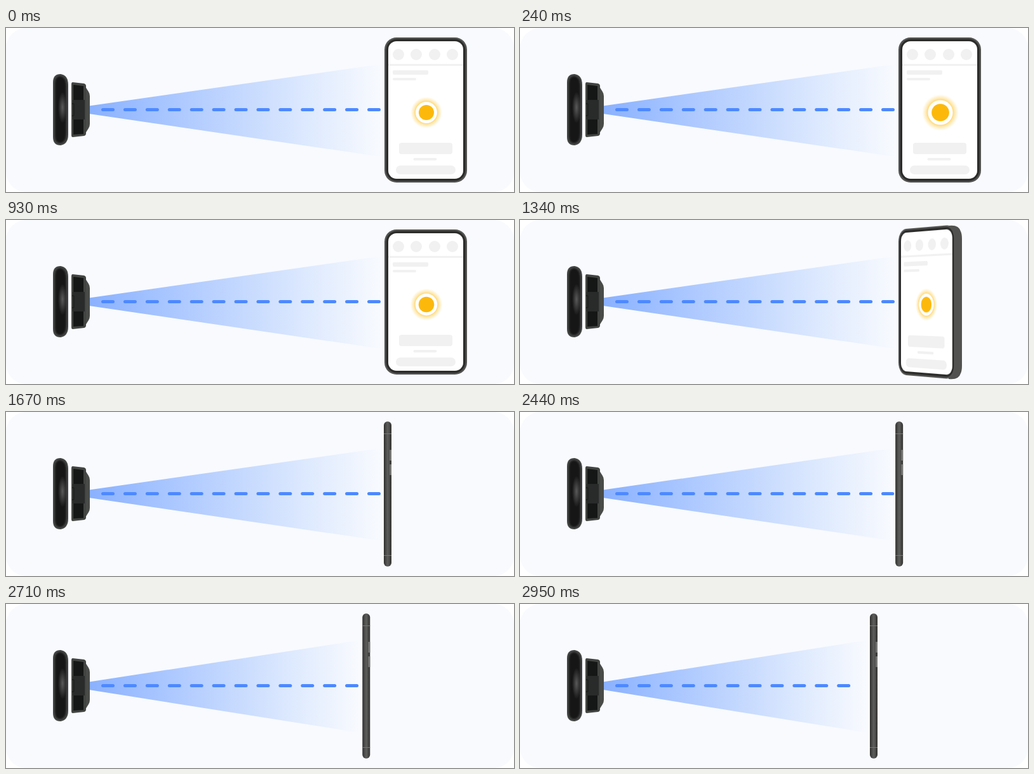
Recreate the animation shown at these times as an HTML page. Size 800x260 px, loop 4.48 s.

```html
<!DOCTYPE html>
<html lang="en">
<head>
<meta charset="utf-8">
<title>Scan distance</title>
<style>
  html, body { margin: 0; width: 100%; height: 100%; overflow: hidden; background: #fff; }
  #stage { position: relative; width: 800px; height: 260px; overflow: hidden; }
  svg { position: absolute; left: 0; top: 0; display: block; }
  #front { transform-origin: 596px 130px; }
</style>
</head>
<body>
<div id="stage">
  <svg width="800" height="260" viewBox="0 0 800 260">
    <defs>
      <linearGradient id="beamFill">
        <stop offset="0" stop-color="#8ab1ff"/>
        <stop offset=".27" stop-color="#a9c6ff"/>
        <stop offset=".58" stop-color="#cbddfe"/>
        <stop offset=".8" stop-color="#e3edfe"/>
        <stop offset="1" stop-color="#f8fafe"/>
      </linearGradient>
      <linearGradient id="edgeFill">
        <stop offset="0" stop-color="#2e2e2d"/>
        <stop offset=".2" stop-color="#444443"/>
        <stop offset=".5" stop-color="#5e5f5d"/>
        <stop offset=".8" stop-color="#444443"/>
        <stop offset="1" stop-color="#2e2e2d"/>
      </linearGradient>
      <radialGradient id="shine">
        <stop offset="0" stop-color="#5a5a5a"/>
        <stop offset="1" stop-color="#5a5a5a" stop-opacity="0"/>
      </radialGradient>
      <filter id="soft" x="-30%" y="-10%" width="160%" height="120%"><feGaussianBlur stdDeviation="1.5"/></filter>
    </defs>

    <rect width="800" height="260" rx="32" fill="#f8fafe"/>
    <path id="beam" fill="url(#beamFill)"/>
    <g id="dashes" stroke="#4d89ff" stroke-width="5" stroke-linecap="round"></g>

    <g id="reader">
      <path d="M74 86Q74 73 86 73Q98 75 98 90V169Q98 184 86 186Q74 186 74 173Z" fill="#484a48"/>
      <path d="M77 87Q77 76 86 76Q95 78 95 91V168Q95 181 86 183Q77 183 77 172Z" fill="#131514" filter="url(#soft)"/>
      <ellipse cx="89" cy="126" rx="7" ry="25" fill="url(#shine)"/>
      <path d="M125 93L130 101Q132 104 132 108V152Q132 156 130 159L125 167Z" fill="#494b49"/>
      <path d="M105 86L123 88Q126 89 126 92V167Q126 170 123 171L105 173Q103 173 103 170V89Q103 86 105 86Z" fill="#424442"/>
      <path d="M106 90L122 92V168L106 169Z" fill="#151716"/>
      <rect x="105" y="114" width="19" height="31" fill="#292b2a"/>
      <path d="M104 120H107V139H104" fill="none" stroke="#171918"/>
    </g>

    <g id="side">
      <rect y="15" width="12" height="230" rx="6" fill="url(#edgeFill)"/>
      <path d="M0 34.5H12M0 227.5H12" stroke="#777876"/>
      <path d="M10.5 60V77M10.5 83V100" stroke="#737472" stroke-width="3"/>
    </g>
    <path id="turnedEdge" d="M675 9Q691 7 694 18Q696 22 696 30V231Q696 239 694 243Q691 254 675 252Z" fill="#51524f"/>
  </svg>

  <svg id="front" width="800" height="260" viewBox="0 0 800 260">
    <defs>
      <radialGradient id="glow">
        <stop offset=".6" stop-color="#ffbf1c" stop-opacity=".85"/>
        <stop offset=".78" stop-color="#ffc83d" stop-opacity=".4"/>
        <stop offset="1" stop-color="#ffd25a" stop-opacity="0"/>
      </radialGradient>
    </defs>
    <rect x="596" y="15" width="130" height="230" rx="19" fill="#535352"/>
    <rect x="598.5" y="17.5" width="125" height="225" rx="17" fill="#2c2c2b"/>
    <rect x="602" y="21" width="118" height="218" rx="13" fill="#fff"/>
    <g fill="#f1f1f1">
      <circle cx="618" cy="42" r="9"/><circle cx="646" cy="42" r="9"/>
      <circle cx="675" cy="42" r="9"/><circle cx="703" cy="42" r="9"/>
      <rect x="602" y="57" width="118" height="3"/>
      <rect x="609" y="67" width="56" height="7" rx="2"/>
      <rect x="609" y="79" width="37" height="4" rx="2"/>
      <rect x="619" y="182" width="84" height="18" rx="4"/>
      <rect x="641.5" y="206" width="37" height="4" rx="2"/>
      <rect x="614" y="218" width="94" height="14" rx="7"/>
    </g>
    <g id="dot">
      <circle r="25" fill="url(#glow)"/>
      <circle r="17" fill="#fff"/>
      <circle r="12" fill="#fcb90c"/>
    </g>
  </svg>
</div>
<script>
  const LOOP = 4480, STEP = 30, STEPS = 18;
  const TURN = 1340, SIDE = 1670, MOVE = 2440;
  const FAR = 595, TRAVEL = 44, BEAM_START = 131;
  const $ = id => document.getElementById(id);
  const easeOut = p => Math.sin(p * Math.PI / 2);
  const clamp = p => Math.min(1, Math.max(0, p));
  const show = (id, on) => $(id).style.display = on ? '' : 'none';

  const dashes = Array.from({ length: 13 }, (_, i) => {
    const line = document.createElementNS('http://www.w3.org/2000/svg', 'path');
    $('dashes').append(line);
    return { line, x: 150 + i * 34.92 };
  });

  // Completed share of an 18-step move whose first step lands at `start`.
  function progress(t, start) {
    return clamp((Math.floor((t - start) / STEP) + 1) / STEPS);
  }

  function drawBeam(phoneX, p) {
    const end = phoneX - 5;
    $('beam').setAttribute('d', `M${BEAM_START} 123.5L${end} 57.5V204L${BEAM_START} 136Z`);
    const lineEnd = Math.min(phoneX + 3, 590 - 57 * p ** 1.5);
    for (const { line, x } of dashes) {
      const right = Math.min(x + 21, lineEnd);
      line.setAttribute('d', `M${x + 2.5} 129.5H${Math.max(x + 2.5, right - 2.5)}`);
      line.style.display = right > x ? '' : 'none';
    }
  }

  function render(t) {
    const p = progress(t, MOVE);
    const phoneX = FAR - TRAVEL * easeOut(p);
    const turning = t >= TURN && t < SIDE;
    drawBeam(phoneX, p);

    show('side', t >= SIDE);
    $('side').setAttribute('transform', `translate(${phoneX} 0)`);
    show('front', t < SIDE);
    show('turnedEdge', turning);
    $('front').style.transform = turning ? 'perspective(1600px) rotateY(-50deg)' : 'none';

    const pulse = easeOut(progress(t, 30)) - easeOut(progress(t, 570));
    $('dot').setAttribute('transform', `translate(662 134) scale(${1 + 0.24 * pulse})`);
  }

  const start = performance.now();
  function tick() {
    render((performance.now() - start) % LOOP);
    requestAnimationFrame(tick);
  }
  render(0);
  requestAnimationFrame(tick);
</script>
</body>
</html>
```
